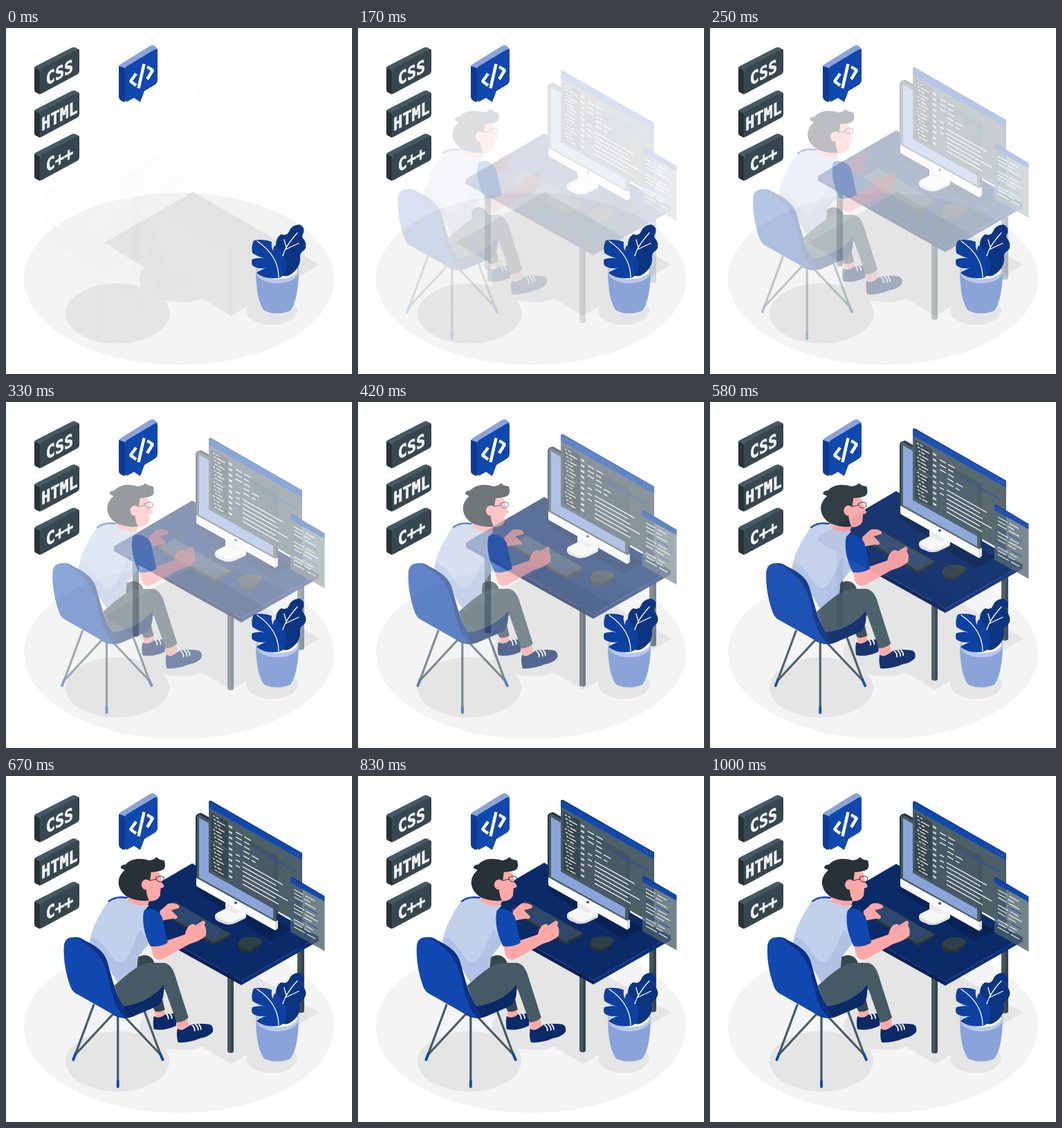
These frames come from a looping animation (500x500 px, 1.04 s). An HTML page:

```html
<!DOCTYPE html>
<html lang="en">
<head>
<meta charset="utf-8">
<title>Programmer at a desk</title>
<style>
html, body { margin: 0; width: 100%; height: 100%; overflow: hidden; background: #fff }
svg { display: block; width: 100vw; height: 100vh }
text { font: bold 25px "DejaVu Sans Mono", monospace; fill: #f5f5f5; stroke: #f5f5f5; stroke-width: .8; text-anchor: middle }
.line { fill: none; stroke-linecap: round; stroke-linejoin: round }
.b { fill: #1148b0 } .l { fill: #8aa4da } .n { fill: #0a2a68 }
.k { fill: #263238 } .d { fill: #37474f } .g { fill: #455a64 } .s { fill: #ffa8a7 }
</style>
</head>
<body>
<svg viewBox="0 0 500 500">
  <ellipse cx="250" cy="362.5" rx="224" ry="124.5" fill="#f4f4f4"/>
  <g fill="#e5e5e5">
    <path d="M270 237L453 342L325 416L283 391Q270 397 248 396C214 394 193 380 193 362Q193 353 200 346L142 310Z"/>
    <ellipse cx="161" cy="412.5" rx="75" ry="43.5"/>
    <ellipse cx="384" cy="408" rx="37" ry="21"/>
  </g>

  <g id="tags"></g>

  <g id="bubble">
    <path class="l" d="M163 56Q163 54 166 52L208 26Q212 24 215 26L219 30V34L172 61Z"/>
    <path fill="#0d3a90" d="M163 55L172 58V107Q169 107 165 104Q163 102 163 99Z"/>
    <path class="b" d="M172 60Q172 57 175 55L215 31Q219 29 219 34V75Q219 79 215 82L200 91L194 107L185 101L176 106Q172 107 172 103Z"/>
    <path fill="none" stroke="#fff" stroke-width="4.400" stroke-linejoin="bevel" d="M188 66L180 77L188 83M199.500 52L191.500 87M204 56L212 61L204 74"/>
  </g>

  <g id="desk">
    <path class="g" d="M183 205h5v119q-5 0-5-3zM421 235h5v108q-5 0-5-3zM320 285h5v116q-5 0-5-3z"/>
    <path class="d" d="M188 205h4v116q0 3-4 3zM426 235h5v105q0 3-5 3zM325 285h4v113q0 3-4 3z"/>
    <path fill="#08205a" d="M156 193L340 297V303L156 200Z"/>
    <path fill="#0b2f7a" d="M340 297L452 233V239L340 303Z"/>
    <path class="n" d="M269 127L452 233L340 297L156 193Z"/>
    <path fill="#082255" d="M272 165L290 155L412 222L383 239Z"/>

    <path class="k" d="M221 195L300 242L325 229V232L300 246L221 198Z"/>
    <path class="d" d="M221 195L243 182L325 229L300 242Z"/>
    <g id="keys" class="line" stroke="#1c4ca6" stroke-width="2.2" stroke-dasharray="3 3.2"></g>
    <path class="k" d="M335 243L336 250Q340 257 354 255Q366 249 371 240Z"/>
    <path fill="#303e46" d="M335 243Q338 234 352 233Q366 233 371 239Q365 246 354 251Q339 252 335 243Z"/>

    <path fill="#dedede" d="M302 203Q301 208 307 211L317 215Q324 216 330 214L345 207Q348 205 347 201Z"/>
    <path fill="#f7f7f7" d="M302 203Q302 200 306 198L322 190Q328 188 334 191L346 198Q348 202 344 204L329 211Q323 213 317 211Z"/>
    <path fill="#ebebeb" d="M317 178L339 190V197L332 200L317 192Z"/>
    <path class="k" d="M274 60Q274 57 278 55L282 54L393 117V212H389L274 149Z"/>
    <path class="g" d="M276 59L279 56L391 119V212H388L276 150Z"/>
    <path class="l" d="M279 61L386 122V207L279 147.500Z"/>
    <path fill="#fafafa" d="M275 148L389 211V224L277 161Q275 160 275 158Z"/>
    <path fill="#dcdcdc" d="M389 211L393 209V221L389 224Z"/>
    <circle class="g" cx="332" cy="184" r="2"/>

    <g transform="matrix(1 .562 0 1 293 37)">
      <path fill="#44575f" opacity=".95" d="M0 9H135V103H0Z"/>
      <path class="d" d="M3 14H28V54H3ZM3 57H28V98H3Z"/>
      <path class="b" d="M0 0H135V9.500H0Z"/>
      <path fill="#0d3a90" d="M0 0L3-2.500L135-1V.5H0Z"/>
      <path fill="#3f6cc4" d="M120 4h2v2h-2zm4 0h2v2h-2zm4 0h2v2h-2z"/>
      <path class="line" stroke="#1b50b5" stroke-width="1.4" d="M67 31H125"/>
      <g id="code"></g>
    </g>
    <g transform="matrix(1 .56 0 1 411 147)">
      <path fill="#4c616a" opacity=".78" d="M0 7H49.500V79H0Z"/>
      <path class="b" d="M0 0H49.500V7.500H0Z"/>
      <path fill="#0d3a90" d="M0 0L2-2L49.500-.5V.5H0Z"/>
      <g id="notes"></g>
    </g>
  </g>

  <g id="person">
    <path class="line" stroke="#455a64" stroke-width="3.2" d="M126 331L97 409M154 344L101 401M198 336L225 409M168 345L222 402M161 346V448"/>
    <path class="line" stroke="#1148b0" stroke-width="3.8" d="M100 401L96.500 410M222 401L226 410M161 441V449"/>

    <path class="s" d="M222 195L233 185Q239 182 248 186Q251 188 249 191L238 194L247 203Q247 208 241 206L229 208L221 210Z"/>
    <path class="d" d="M186 266C194 256 208 257 213 268L220 300L229 338Q223 343 215 341L200 310Z"/>
    <path class="s" d="M214 340Q222 342 228 338L231 349L216 352Z"/>
    <path class="n" d="M213 347Q221 352 230 344L243 343Q247 350 245 361Q228 369 213 366Q211 356 213 347Z"/>
    <path class="line" stroke="#fff" stroke-width="1.8" d="M231 344Q234 346 234 351M236 343Q239 346 239 350"/>
    <path class="s" d="M245 354Q255 356 261 349L264 362L248 369Z"/>
    <path class="n" d="M247 365C253 370 260 364 267 359Q282 357 294 359Q300 362 298 370Q292 377 280 379Q264 386 248 385Q245 375 247 365Z"/>
    <path class="line" stroke="#fff" stroke-width="1.8" d="M268 360Q272 362 272 368M273 359Q277 362 277 367M278 359Q281 362 281 366"/>

    <path fill="#c3d0eb" d="M176 179C160 171 148 178 141 190C130 207 122 225 120 241L140 264L163 302L187 294L190 262L208 240L199 195L206 187Z"/>
    <path fill="#b1c2e5" d="M122 234C142 232 150 272 166 269C178 264 183 240 194 222L206 240L190 262L187 294L163 302L140 264L120 241Z"/>
    <path class="line" stroke="#1148b0" stroke-width="2.5" d="M148 181Q158 173 174 176"/>
    <path class="g" d="M156 303C178 284 190 272 208 270H228C239 272 243 284 247 299L263 349Q256 356 246 356L229 308C210 326 190 334 168 336Z"/>

    <path class="n" d="M160 322L169 333C192 330 214 319 227 302Q229 324 219 332L182 348Q168 353 154 345Z"/>
    <path fill="#0c3285" d="M97 233Q105 232 112 237C130 246 139 252 145 266C151 286 157 314 169 333L176 349Q164 351 154 345L120 320Z"/>
    <path class="b" d="M97 233Q84 233 83 246C82 266 86 286 92 303Q94 310 100 314L153 344Q162 349 171 348C157 337 152 314 147 291C141 265 129 252 112 241Q104 233 97 233Z"/>

    <path class="s" d="M177 172L208 176L204 187Q190 190 175 181Z"/>
    <path class="s" d="M190 140L220 139Q224 145 224 153L228 159Q227 162 223 162L222 173Q218 181 207 181L190 176Z"/>
    <path class="k" d="M171 136L165 133Q165 128 172 128C180 119 194 118 206 122Q214 121 217 117Q219 121 228 122Q231 131 227 135Q220 139 209 139Q208 147 207 153L202 166Q203 174 206 180Q190 182 175 175C160 165 157 148 171 136Z"/>
    <ellipse class="s" cx="202" cy="157" rx="7" ry="7.500"/>
    <path class="line" stroke="#263238" d="M207 151L217 149M216 147Q222 143 227 146Q229 152 224 153Q217 154 216 147"/>

    <path class="s" d="M208 244L232 238L258 229C260 219 265 213 271 214L273 216L284 209Q289 210 286 216Q290 220 288 231Q281 238 264 243L227 264Q214 269 211 257Z"/>
    <path class="line" stroke="#f08a8c" stroke-width=".8" d="M265 224L274 217M278 217L284 213"/>
    <path class="b" d="M199 194C208 189 220 194 225 204L233 241Q222 248 208 246C199 230 195 207 199 194Z"/>
  </g>

  <g id="plant">
    <path class="l" d="M361 349C361 380 366 401 374 409Q392 416 410 409C419 400 423 375 423 347Z"/>
    <ellipse cx="392" cy="352" rx="31" ry="17" fill="#b9c8e8"/>
    <ellipse cx="393" cy="350" rx="28" ry="13" fill="#fff"/>
    <path fill="#0b3581" d="M394 335C389 320 387 304 398 298Q406 301 409 294Q412 285 424 284Q432 287 430 296Q426 302 431 306Q436 315 431 321Q424 325 425 332Q426 347 410 357Q404 360 398 357Z"/>
    <path fill="#0e409f" d="M358 307Q372 304 384 309Q383 317 386 322Q386 316 389 314Q405 325 406 345Q404 358 395 361Q374 364 362 354Q366 350 376 347Q364 349 356 343Q354 338 356 334Q366 331 375 333Q362 330 356 325Q354 315 358 307Z"/>
    <path class="line" stroke="#fff" stroke-width="1.3" d="M363 308C382 321 394 339 394 360M421 296C411 307 403 318 400 329M405 317L402 306M404 320L423 311"/>
  </g>
</svg>
<script>
const $ = id => document.getElementById(id);
const fill = (id, html) => $(id).innerHTML = html;
const rand = n => Math.abs(Math.sin(n * 12.9898) * 43758.5453) % 1;
const range = n => [...Array(n).keys()];
const bar = (x, y, w, h = 1.5, color = '#f0f2f3') =>
  `<rect x="${x}" y="${y}" width="${w}" height="${h}" fill="${color}"/>`;

fill('tags', ['CSS', 'HTML', 'C++'].map((label, i) => `<g transform="translate(0 ${i * 62.5})">
  <path class="g" d="M41 58Q41 56 43 55L95 28.500Q98 27 101 28.500L106 31.500L49 62Z"/>
  <path class="k" d="M41 57L49 61V96L43 93Q41 92 41 90Z"/>
  <path class="d" d="M49 63Q49 60 52 58L103 31Q106 30 106 33V62Q106 65 103 67L52 94.500Q49 96.500 49 94Z"/>
  <text transform="matrix(.87 -.45 0 1 77.5 73)">${label}</text></g>`).join(''));

fill('keys', range(4).map(i => {
  const x = 229 + i * 4.8, y = 195 - i * 2.8;
  return `<path d="M${x} ${y}l70 41"/>`;
}).join(''));

// file list, line numbers, then code: short statements above a long block
fill('code', range(16).map(i => {
  const y = 16.5 + i * 5 + (i > 7 ? 2 : 0), x = 6 + i % 4;
  return bar(x, y, 3, 1.4) + bar(x + 4.5, y, 4 + rand(i) * 9, 1.4);
}).join('') + range(10).map(i => bar(29, 18 + i * 8, 5, 3, '#c9d0d3')).join('')
  + range(5).map(i => {
    const x = i > 2 ? 50 : 39, y = 22 + i * 7;
    return bar(x, y, 9) + bar(x + 12, y, 4 + rand(i + 3) * 10);
  }).join('')
  + range(6).map(i => bar(49, 60 + i * 6.3, 48 + rand(i + 9) * 21)).join('')
  + range(3).map(i => bar(39, 54 + i * 8, 6)).join(''));

fill('notes', range(11).map(i => {
  const y = 14 + i * 5.4, w = 6 + rand(i + 20) * 10;
  const color = i % 4 == 3 ? '#1b50b5' : '#f0f2f3';
  return bar(5, y, w, 1.3, color) + bar(8 + w, y, 8 + rand(i + 40) * 14, 1.3, color);
}).join(''));

// cubic-bezier(.36, -.01, .5, 1.38): slides past its end and settles
const bezier = (a, b, s) => 3 * (1 - s) ** 2 * s * a + 3 * (1 - s) * s * s * b + s ** 3;
function ease(p) {
  let lo = 0, hi = 1;
  for (let i = 0; i < 30; i++) {
    const mid = (lo + hi) / 2;
    if (bezier(.36, .5, mid) < p) lo = mid; else hi = mid;
  }
  return bezier(-.01, 1.38, hi);
}

const LOOP = 1040, FPS = 24, SHIFT = 30;
function draw(now) {
  const step = Math.floor((now % LOOP + 4) * FPS / 1000);
  const v = ease(Math.min(1, (step + 1) / FPS));
  const off = SHIFT * (1 - v);
  $('desk').setAttribute('transform', `translate(0 ${off})`);
  $('person').setAttribute('transform', `translate(${-off} 0)`);
  for (const id of ['desk', 'person']) $(id).setAttribute('opacity', Math.max(0, Math.min(1, v)));
}
function tick() {
  draw(performance.now());
  requestAnimationFrame(tick);
}
tick();
</script>
</body>
</html>
```
